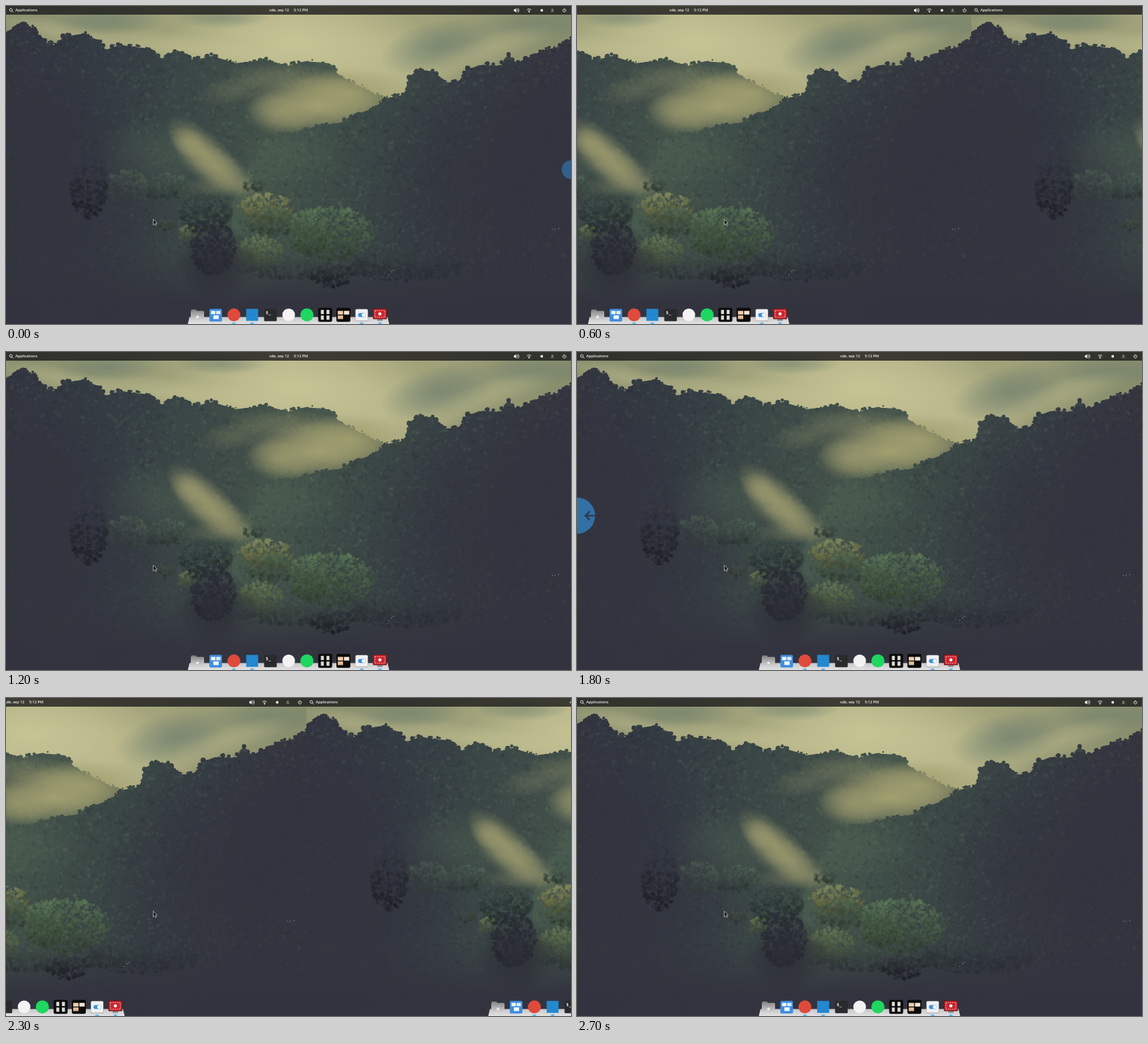
These frames come from a looping animation (850 by 478 pixels, 2800 ms). An HTML page with a canvas:

```html
<!DOCTYPE html>
<html lang="es">
<head>
<meta charset="utf-8">
<title>Workspace switch</title>
<style>
html, body { margin: 0; width: 100%; height: 100%; overflow: hidden; background: #34353f; }
canvas { display: block; }
</style>
</head>
<body>
<canvas id="stage" width="850" height="478"></canvas>
<script>
const W = 850, H = 478, LOOP = 2800, TICK = 100;
const stage = document.getElementById('stage').getContext('2d');
const desktop = document.createElement('canvas');
desktop.width = W;
desktop.height = H;
const g = desktop.getContext('2d');

let seed = 7;
const rnd = () => (seed = (seed * 16807) % 2147483647) / 2147483647;
const between = (a, b) => a + (b - a) * rnd();

function disc(c, x, y, r, fill) {
  c.fillStyle = fill;
  c.beginPath();
  c.arc(x, y, r, 0, 7);
  c.fill();
}

function box(x, y, w, h, fill, r = 0) {
  g.fillStyle = fill;
  g.beginPath();
  g.roundRect(x, y, w, h, r);
  g.fill();
}

function line(points, color, width) {
  g.strokeStyle = color;
  g.lineWidth = width;
  g.beginPath();
  points.forEach(([x, y]) => g.lineTo(x, y));
  g.stroke();
}

// Soft elliptical glow; rgb is "r,g,b"
function haze(x, y, rx, ry, rgb, alpha, tilt = 0) {
  g.save();
  g.translate(x, y);
  g.rotate(tilt);
  g.scale(rx, ry);
  const fill = g.createRadialGradient(0, 0, 0, 0, 0, 1);
  fill.addColorStop(0, `rgba(${rgb},${alpha})`);
  fill.addColorStop(.5, `rgba(${rgb},${alpha * .6})`);
  fill.addColorStop(1, `rgba(${rgb},0)`);
  disc(g, 0, 0, 1, fill);
  g.restore();
}

function gradient(x0, y0, x1, y1, ...colors) {
  const fill = g.createLinearGradient(x0, y0, x1, y1);
  colors.forEach((color, i) => fill.addColorStop(i / (colors.length - 1), color));
  return fill;
}

// Forest below a treeline, with a ragged edge and mottled leaves
function ridge(points, fill, leaves) {
  g.save();
  g.beginPath();
  points.forEach(([x, y], i) => {
    const [nx, ny] = points[i + 1] || [x, y];
    const steps = Math.ceil(Math.hypot(nx - x, ny - y) / 3) || 1;
    for (let s = 0; s < steps; s++) {
      const px = x + (nx - x) * s / steps + between(-2, 2);
      const py = y + (ny - y) * s / steps + between(-3, 5);
      const r = between(1, 4);
      g.moveTo(px + r, py);
      g.arc(px, py, r, 0, 7);
    }
  });
  const left = points[0][0], right = points[points.length - 1][0];
  g.moveTo(left, H);
  points.forEach(([x, y]) => g.lineTo(x, y));
  g.lineTo(right, H);
  g.clip();
  g.fillStyle = fill;
  g.fillRect(0, 0, W, H);
  for (let i = 0; i < leaves; i++) {
    const tone = rnd() < .5 ? '105,128,98' : '32,34,46';
    disc(g, between(left, right), between(25, 410), between(.7, 3.2), `rgba(${tone},${between(.04, .16)})`);
  }
  g.restore();
}

// Rounded tree crown, lit from above
function crown(x, y, rx, ry, [r, gr, b]) {
  const n = rx * ry * .3;
  for (let i = 0; i < n; i++) {
    const a = between(0, 6.283), d = Math.sqrt(rnd());
    const dy = Math.sin(a) * d;
    const k = .88 - dy * .26 + between(-.17, .14);
    disc(g, x + Math.cos(a) * d * rx, y + dy * ry, between(1, 3.2),
      `rgba(${r * k},${gr * k},${b * k},.5)`);
  }
}

function wallpaper() {
  const pale = '200,197,150', olive = '163,160,112', teal = '98,120,108', dark = '50,51,62';

  g.fillStyle = gradient(0, 0, W, 0, '#858b6b', '#9c9e77', '#b5b488', '#a2a27a', '#858c6c');
  g.fillRect(0, 0, W, H);
  haze(440, 55, 200, 65, pale, .9);
  haze(70, 38, 110, 20, pale, .4, .2);
  haze(250, 62, 170, 24, pale, .5, .1);
  haze(565, 95, 140, 60, pale, .5);
  haze(155, 22, 85, 22, teal, .5);
  haze(325, 18, 70, 16, teal, .45);
  haze(650, 60, 90, 38, teal, .6, -.25);
  haze(790, 28, 90, 22, teal, .4);
  haze(735, 62, 100, 22, pale, .3, -.3);

  ridge([[0, 40], [12, 33], [26, 27], [46, 36], [52, 52], [72, 59], [88, 46], [120, 41], [142, 55],
    [150, 66], [170, 59], [215, 64], [234, 79], [262, 68], [282, 82], [310, 75], [345, 86],
    [390, 81], [425, 90], [450, 83], [485, 86], [502, 105], [560, 135], [640, 170]],
    gradient(0, 0, 480, 60, '#32343f', '#343c43', '#3d4a47', '#47564c'), 6500);

  haze(440, 112, 110, 25, olive, .4, .1);
  haze(470, 150, 112, 45, olive, .98);
  haze(515, 132, 90, 40, olive, .9);
  haze(415, 160, 55, 36, olive, .65);
  haze(345, 125, 60, 22, olive, .25, -.2);

  ridge([[340, 300], [372, 235], [390, 203], [425, 192], [460, 183], [505, 175], [520, 165],
    [550, 155], [575, 138], [600, 133], [606, 106], [622, 96], [645, 99], [655, 114], [685, 116],
    [692, 97], [712, 89], [745, 90], [756, 73], [768, 86], [805, 68], [832, 61], [850, 50]],
    gradient(400, 150, 780, 270, '#47584d', '#3c4946', '#363d43', '#34353f'), 7000);

  haze(225, 225, 95, 60, '84,104,84', .4);
  haze(430, 225, 90, 45, '84,104,84', .3);
  haze(300, 222, 78, 30, olive, .75, .75);
  haze(318, 245, 80, 30, olive, .65, .55);
  haze(275, 205, 32, 22, olive, .6, .5);
  haze(325, 270, 60, 18, olive, .3);

  crown(183, 270, 32, 24, [82, 104, 82]);
  crown(240, 272, 35, 20, [70, 89, 76]);
  crown(370, 270, 16, 9, [60, 76, 66]);
  crown(300, 312, 40, 30, [51, 64, 61]);
  crown(390, 304, 42, 22, [122, 127, 82]);
  crown(400, 325, 42, 22, [72, 91, 69]);
  crown(490, 342, 64, 42, [80, 104, 77]);
  crown(455, 340, 30, 36, [78, 100, 74]);
  crown(382, 372, 36, 28, [94, 111, 75]);
  crown(273, 341, 14, 12, [98, 112, 74]);
  crown(240, 330, 14, 9, [68, 80, 62]);
  crown(440, 395, 95, 16, [60, 76, 64]);
  crown(600, 392, 90, 22, [50, 60, 60]);

  // Darkness closing in from the sides and the bottom
  haze(70, 330, 210, 190, dark, .95);
  haze(40, 170, 150, 120, dark, .9);
  haze(770, 270, 230, 190, dark, .95);
  haze(825, 170, 120, 100, dark, .85);
  g.fillStyle = gradient(0, 365, 0, 445, `rgba(${dark},0)`, `rgba(${dark},.98)`);
  g.fillRect(0, 365, W, H);
  crown(312, 362, 35, 42, [42, 44, 54]);
  haze(315, 385, 65, 60, '43,44,54', .95);
  crown(125, 270, 28, 50, [47, 49, 59]);
  crown(490, 405, 32, 18, [44, 48, 55]);

  for (const [x, y] of [[821, 335], [825, 335], [831, 334], [579, 399], [575, 403], [582, 397]])
    box(x, y, 1.3, 1, 'rgba(190,195,175,.7)');
}

function panel() {
  const white = '#f2f2f0';
  box(0, 0, W, 13, 'rgba(22,22,24,.76)');
  g.font = '600 5.6px "Open Sans", sans-serif';
  g.fillStyle = white;
  g.fillText('Applications', 14, 8.4);
  g.fillText('sáb, sep 12', 396, 8.4);
  g.fillText('5:12 PM', 433, 8.4);

  const arc = (x, y, r, from, to, width = .9) => {
    g.strokeStyle = white;
    g.lineWidth = width;
    g.beginPath();
    g.arc(x, y, r, from, to);
    g.stroke();
  };
  arc(7.3, 5.8, 2, 0, 7);
  line([[8.8, 7.3], [11, 9.5]], white, 1);

  g.fillStyle = white;
  g.beginPath();
  [[764, 5], [765.5, 5], [767.5, 3.2], [767.5, 9.8], [765.5, 8], [764, 8]].forEach(p => g.lineTo(...p));
  g.fill();
  arc(767, 6.5, 2.5, -.9, .9);
  arc(767, 6.5, 4.5, -.9, .9);
  for (const r of [2.4, 4.6]) arc(787, 9, r, -2.4, -.75);
  disc(g, 787, 8.8, 1, white);
  disc(g, 806, 6.5, 2, white);
  box(820.5, 4, 3, 4, '#777870', 1.2);
  box(819.5, 7.8, 5, 1, '#777870');
  arc(840, 6.7, 2.3, -1, 4.15);
  line([[840, 3.5], [840, 6.5]], white, 1);
}

const icons = [
  () => {
    box(-9.5, -8, 8, 4, '#858585', 1);
    box(-10, -6, 20, 15, gradient(0, -6, 0, 9, '#8e8e8e', '#d8d8d8'), 1.5);
    g.fillStyle = '#f4f4f4';
    g.font = '8px "DejaVu Sans", sans-serif';
    g.fillText('★', -3.4, 5.5);
  },
  () => {
    box(-9.5, -9, 19, 19, '#3f8ede', 2);
    box(-7, -6, 6.5, 5, '#f3f8fd');
    box(.7, -6, 6.5, 5, '#dcebfa');
    box(-3.5, .7, 8, 5.5, '#f3f8fd');
  },
  () => disc(g, 0, 0, 9.7, '#df4a3c'),
  () => box(-9, -9, 18, 18, '#2388cf'),
  () => {
    box(-9.5, -9, 19, 18.5, '#282a2c', 1.5);
    g.fillStyle = '#e8e8e8';
    g.font = '700 6.5px "DejaVu Sans Mono", monospace';
    g.fillText('$_', -7, -1);
  },
  () => disc(g, 0, 0, 9.5, '#f4f2f2'),
  () => disc(g, 0, 0, 9.9, '#1fd660'),
  () => {
    box(-10.5, -10.5, 21, 21, '#0b0b0b', 2.5);
    for (const x of [-6.5, 2]) for (const y of [-7.5, 1]) box(x, y, 4.5, 6.3, '#dadbd4');
  },
  () => {
    box(-10.5, -10.5, 21, 21, '#0b0b0b', 2.5);
    box(-8.5, -6, 8, 5.5, '#f0cdae');
    box(.8, -6, 8, 5.5, '#f6e5d4');
    box(-8.5, .8, 8, 5.5, '#e2ba96');
  },
  () => {
    box(-9.5, -8.5, 19, 18, '#a9a9a9', 1.5);
    box(-9, -8.5, 18, 17, '#f1f1f1', 1.5);
    box(-5.5, -2.8, 11.5, 6, '#3d91df', 3);
    disc(g, 3, .2, 2.7, '#fff');
  },
  () => {
    box(-4, 6, 8, 3, '#86898d');
    box(-10.5, -9.5, 21, 16, '#6f161b', 1.5);
    box(-9.5, -8.5, 19, 14, '#c9252d', 1);
    g.strokeStyle = '#f3c7c7';
    g.lineWidth = 1;
    g.setLineDash([1.6, 1.6]);
    g.strokeRect(-7.5, -6.5, 15, 10);
    g.setLineDash([]);
    disc(g, 0, -1.5, 2.4, '#fff');
  }
];

function dock() {
  g.fillStyle = gradient(0, 467, 0, H, '#c6c6c8', '#e2e2e3');
  g.beginPath();
  [[276, 467.5], [574, 467.5], [576.5, H], [273.5, H]].forEach(p => g.lineTo(...p));
  g.fill();
  icons.forEach((draw, i) => {
    const x = 288 + i * 27.45;
    g.save();
    g.translate(x, 464.3);
    draw();
    g.restore();
    if ([2, 3, 9, 10].includes(i)) haze(x, 477, 4, 2, '50,165,245', 1);
  });
}

const easeOut = x => 1 - (1 - Math.min(1, Math.max(0, x))) ** 3;

// Edge bubble of the swipe; dir is the way its arrow points
function bubble(x, dir, r) {
  const alpha = Math.min(.88, .4 + .017 * r);
  disc(stage, x, 246, r, `rgba(52,122,180,${alpha})`);
  const k = r / 27;
  stage.save();
  stage.translate(x, 246);
  stage.scale(-dir * k, k);
  stage.globalAlpha = Math.min(1, Math.max(0, (r - 13) / 14));
  stage.strokeStyle = '#2d3c50';
  stage.lineWidth = 2.6;
  stage.beginPath();
  stage.moveTo(26.5, 0);
  stage.lineTo(13, 0);
  stage.moveTo(19, -6.5);
  stage.lineTo(12.5, 0);
  stage.lineTo(19, 6.5);
  stage.stroke();
  stage.restore();
}

function pointer() {
  stage.beginPath();
  [[221.5, 320.5], [221.5, 329], [223.5, 327.2], [225, 330], [226.3, 329.3], [225, 326.6], [227.3, 326.3]]
    .forEach(p => stage.lineTo(...p));
  stage.closePath();
  stage.fillStyle = '#111';
  stage.strokeStyle = '#d8d8d8';
  stage.lineWidth = .7;
  stage.fill();
  stage.stroke();
}

const NEXT = 566, BACK = 2233, SLIDE = 300, GROWTH = .085;

function frame(now) {
  const t = Math.floor(now % LOOP / TICK) * TICK;
  const shift = Math.round(W * (easeOut((t - NEXT) / SLIDE) - easeOut((t - BACK) / SLIDE)));
  stage.drawImage(desktop, -shift, 0);
  stage.drawImage(desktop, W - shift, 0);
  if (t < NEXT) bubble(W, 1, 14 + t * GROWTH);
  if (t > 1480 && t < BACK) bubble(0, -1, (t - 1480) * GROWTH);
  pointer();
  requestAnimationFrame(frame);
}

wallpaper();
panel();
dock();
requestAnimationFrame(frame);
</script>
</body>
</html>
```
